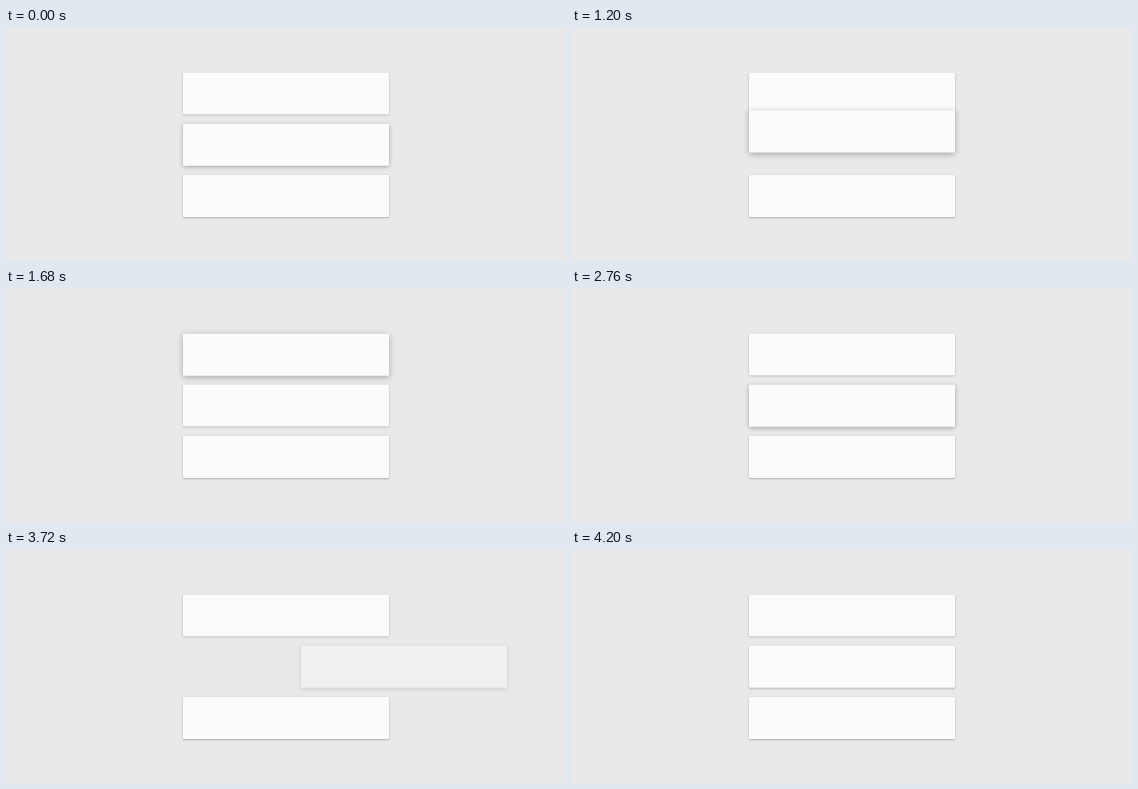
Write an HTML page that moves like this. It is 560 by 233 pixels and loops after 4.56 s.

```html
<!DOCTYPE html>
<html lang="en">
<head>
<meta charset="utf-8">
<title>Card list</title>
<style>
  html, body { margin: 0; height: 100%; overflow: hidden; }
  #stage { position: relative; height: 100%; overflow: clip; contain: strict; background: #e9e9e9; }
  .card {
    position: absolute; left: 177px; top: 0; width: 206px; height: 42px;
    border-radius: 1px; background: #fbfbfb;
  }
</style>
</head>
<body>
<div id="stage">
  <div class="card" id="next"></div>
  <div class="card" id="third"></div>
  <div class="card" id="swiped"></div>
  <div class="card" id="dragged"></div>
</div>
<script>
const LOOP = 4560, STEP = 120;
const TOP = 44.4, PITCH = 51.3;

const mix = (a, b, k) => a + (b - a) * k;

// Cubic ease in and out between two times, 0 to 1.
function ease(t, from, to) {
  const u = Math.min(1, Math.max(0, (t - from) / (to - from)));
  return u < .5 ? 4 * u ** 3 : 1 - 4 * (1 - u) ** 3;
}

// Row 0 is the top slot; lift raises the card's shadow.
function place(id, row, { x = 0, lift = 0, opacity = 1 } = {}) {
  const s = document.getElementById(id).style;
  s.transform = `translate(${x}px, ${TOP + PITCH * row}px)`;
  s.opacity = opacity;
  s.boxShadow = `0 ${mix(.7, 1.5, lift)}px ${mix(2, 6, lift)}px rgba(0,0,0,.3)`;
}

function draw(t) {
  // The middle card is dragged up and trades places with the top one.
  const lift = mix(.5, 1, ease(t, 600, 1200)) * (1 - ease(t, 1680, 2160));
  place('dragged', 1 - ease(t, 800, 1800), { lift });

  // The card that came down lifts, then slides right and fades out.
  const x = 118 * Math.max(0, (t - 3120) / 600) ** 1.22;
  place('swiped', ease(t, 1200, 1740), {
    x, lift: .7 * ease(t, 1680, 1920), opacity: Math.max(0, 1 - x / 205)
  });

  // The rest close the gap.
  const gap = 1 - ease(t, 3720, 4150);
  place('third', 1 + gap);
  place('next', 2 + 2 * gap);
}

const start = performance.now();
function frame() {
  const t = (performance.now() - start) % LOOP;
  draw(Math.floor(t / STEP) * STEP);
  requestAnimationFrame(frame);
}
frame();
</script>
</body>
</html>
```
